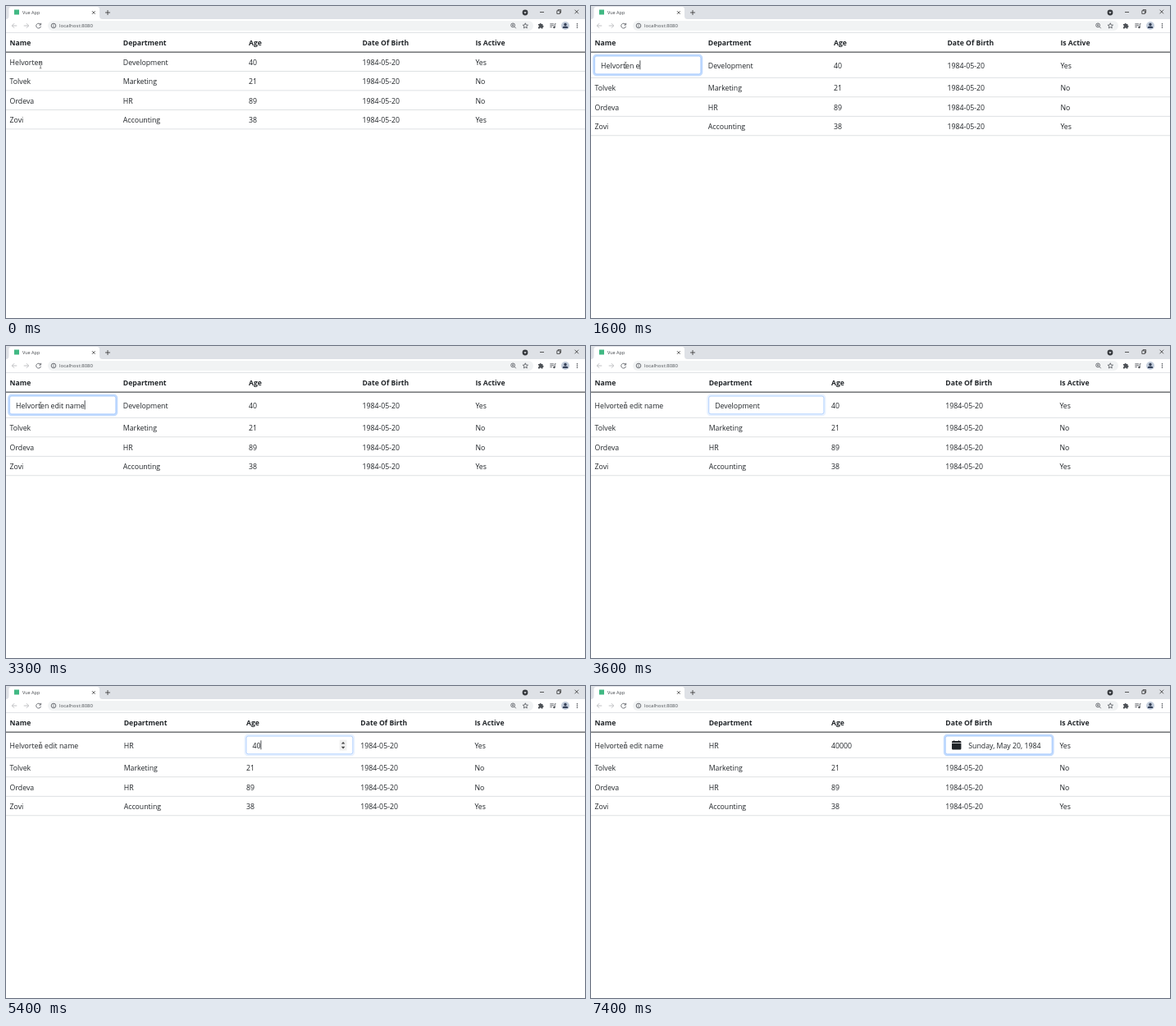
Recreate the animation shown at these times as an HTML page. Size 706 px wide and 380 px high, loop 8 s.

```html
<!DOCTYPE html>
<html lang="en">
<head>
<meta charset="utf-8">
<title>Vue App</title>
<style>
  html, body { margin: 0; width: 100%; height: 100%; overflow: hidden; background: #fff; }
  svg { display: block; width: 100vw; height: 100vh; }
  text { font: 8.75px "Open Sans", "Noto Sans", sans-serif; fill: #212529; white-space: pre; }
  .head { font-size: 8.65px; font-weight: 700; }
  .title { font-size: 5.5px; fill: #45494d; }
  .url { font-size: 6.1px; fill: #4d5156; }
  .icon { fill: none; stroke: #5f6368; stroke-width: .9; }
  .dim { stroke: #babcbe; }
  .dark { stroke: #333; stroke-width: .8; }
  .solid { fill: #4d5156; }
  .rule { fill: #d6dadd; }
</style>
</head>
<body>
<svg viewBox="0 0 706 380" preserveAspectRatio="none">
  <!-- browser tab strip -->
  <rect width="706" height="16" fill="#dee1e6"/>
  <path d="M0 16q3.5 0 3.5-4V4q0-3 3-3H111q3 0 3 3v8q0 4 3.500 4z" fill="#fff"/>
  <rect x="10" y="4.500" width="6" height="6" fill="#41b883"/>
  <text class="title" x="20" y="9.800">Vue App</text>
  <path class="icon dark" d="M105 6.200l3.600 3.600m0-3.600l-3.600 3.600M121 8h6m-3-3v6"/>
  <circle cx="633" cy="8" r="3.400" fill="#35383c"/>
  <path d="M631.300 7.300h3.400l-1.700 2.200z" fill="#dee1e6"/>
  <path class="icon dark" d="M651 7.500h5M671.800 5.800h3.600v3.600h-3.600zM673 5.800V4.600h3.600v3.600h-1.200M693.500 4.700l4.600 4.600m0-4.600l-4.600 4.600"/>

  <!-- toolbar -->
  <rect x="51" y="18" width="592" height="12" rx="6" fill="#f1f3f4"/>
  <rect y="32" width="706" height=".8" fill="#dadce0"/>
  <path class="icon dim" d="M13.300 24H7.300m2.800-2.800L7.300 24l2.800 2.800M21.700 24h6m-2.800-2.800l2.800 2.800-2.800 2.800"/>
  <path class="icon" d="M42 22.400a2.900 2.900 0 1 0 .5 2.400M42.600 20.800v2.300h-2.300"/>
  <circle class="icon" cx="58" cy="24" r="2.800" stroke-width=".7"/>
  <path class="icon" d="M58 23.600v2M58 22.200v.7"/>
  <text class="url" x="65" y="26.200">localhost:8080</text>
  <path class="icon" d="M619.800 25.200l2 2M617 23.400h2.200m-1.100-1.100v2.200"/>
  <circle class="icon" cx="618.100" cy="23.400" r="2.400"/>
  <path class="icon" stroke-width=".7" d="M633.300 20.800l.9 2.200 2.300.2-1.800 1.500.6 2.300-2-1.200-2 1.200.6-2.300-1.800-1.500 2.300-.2z"/>
  <path class="solid" d="M649 22h1.600a1.100 1.100 0 0 1 2.200 0h1.700v1.700a1.100 1.100 0 0 1 0 2.200v1.500h-1.800a1 1 0 0 0-2 0H649v-1.800a1 1 0 0 0 0-2z"/>
  <path class="icon" d="M663.300 21.800h4.600m-4.600 1.900h4.600m-4.600 1.900h2.600M669.200 26v-4.300h1.400"/>
  <circle class="solid" cx="668.400" cy="26" r="1.200"/>
  <circle cx="682" cy="24" r="5" fill="#c3cddb"/>
  <circle cx="682" cy="22.500" r="1.700" fill="#37435a"/>
  <path d="M678.700 27q0-2.400 3.300-2.400t3.300 2.400z" fill="#37435a"/>
  <g class="solid"><circle cx="696.500" cy="21.700" r=".8"/><circle cx="696.500" cy="24" r=".8"/><circle cx="696.500" cy="26.300" r=".8"/></g>

  <!-- table -->
  <g id="table"></g>
  <rect y="55.600" width="706" height="1.100" fill="#3c4043"/>

  <!-- active editor -->
  <g id="editor">
    <rect id="ring" y="59.900" height="24.100" rx="3.300" fill="none" stroke="#c2dbfe" stroke-width="2.500"/>
    <rect id="box" y="61.100" height="21.700" rx="2.300" fill="#fff" stroke="#86b7fe" stroke-width=".6"/>
    <text id="value" y="75.600" xml:space="preserve"></text>
    <rect id="caret" y="66.300" width=".8" height="11" fill="#212529"/>
    <g id="spin">
      <rect x="406.700" y="65.600" width="8.800" height="13" fill="#f0f0f0"/>
      <path d="M408.800 70.600h4.600l-2.300-2.700zM408.800 73.700h4.600l-2.300 2.700z" fill="#444"/>
    </g>
    <path id="calendar" fill="#212529" d="M440 69v-.8q0-1.200 1.200-1.200h1v-.7h1v.7h4.800v-.7h1v.7h1.200q1.200 0 1.200 1.200v.8zM440 69.800h11.400v6.500q0 1.200-1.200 1.200h-9q-1.200 0-1.200-1.200z"/>
  </g>

  <!-- text pointer -->
  <path d="M40.800 68.300q1.300 0 1.300.8 0-.8 1.300-.8M42.100 69v6.300M40.800 76q1.300 0 1.300-.8 0 .8 1.300.8" fill="none" stroke="#555" stroke-width=".7"/>
</svg>
<script>
const LOOP = 8000;
const HEAD = ["Name", "Department", "Age", "Date Of Birth", "Is Active"];
const BIRTH = "1984-05-20";
const ROWS = [
  ["Helvorten", "Development", "40", BIRTH, "Yes"],
  ["Tolvek", "Marketing", "21", BIRTH, "No"],
  ["Ordeva", "HR", "89", BIRTH, "No"],
  ["Zovi", "Accounting", "38", BIRTH, "Yes"]
];
const COLS_A = [4.6, 142.8, 296, 434.4, 572.4];
const COLS_B = [4.6, 143.7, 293, 432.3, 571.4];

// One editor per column: start time, box width, then [time, value, caret shown]
const EDITS = [
  { at: 500, w: 129.2, keys: [
    [500, "", 1], [1000, "", 0], [1300, " ", 1], [1600, " e", 1],
    [1900, " ed", 1], [2000, " edi", 1], [2300, " edit", 1], [2500, " edit ", 1],
    [2800, " edit n", 1], [2900, " edit na", 1], [3100, " edit nam", 1], [3300, " edit name", 1]
  ].map(([t, s, c]) => [t, ROWS[0][0] + s, c]) },
  { at: 3600, w: 140.2, keys: [[3600, "Development", 0], [4500, "HR", 0]] },
  { at: 5400, w: 129.8, keys: [
    [5400, "40", 1], [5900, "40", 0], [6400, "40", 1],
    [6500, "400", 1], [6700, "4000", 1], [6900, "40000", 1]
  ] },
  { at: 7300, w: 129.8, keys: [[7300, "Sunday, May 20, 1984", 0]] }
];

const $ = id => document.getElementById(id);
const set = (el, attrs) => { for (const k in attrs) el.setAttribute(k, attrs[k]); };
const show = (el, on) => { el.style.display = on ? "" : "none"; };
function add(tag, attrs, text = "") {
  const el = document.createElementNS("http://www.w3.org/2000/svg", tag);
  set(el, attrs);
  el.textContent = text;
  return $("table").appendChild(el);
}

const heads = HEAD.map(s => add("text", { class: "head", y: 48.2 }, s));
const rows = ROWS.map(row => ({
  rule: add("rect", { class: "rule", width: 706, height: .8 }),
  cells: row.map(s => add("text", {}, s))
}));

function draw(t) {
  const col = EDITS.findLastIndex(e => e.at <= t);
  const editing = col >= 0;
  const xs = col < 1 ? COLS_A : COLS_B;

  heads.forEach((el, c) => el.setAttribute("x", xs[c]));
  rows.forEach(({ rule, cells }, r) => {
    const drop = editing ? (r ? 7.9 : 3.8) : 0;
    rule.setAttribute("y", 79 + r * 23.5 + (editing ? 7.9 : 0));
    cells.forEach((el, c) => set(el, { x: xs[c], y: 71.8 + r * 23.5 + drop }));
  });
  rows[0].cells.forEach((el, c) => {
    el.textContent = c < col ? EDITS[c].keys.at(-1)[1] : ROWS[0][c];
    show(el, c !== col);
  });

  show($("editor"), editing);
  if (!editing) return;
  const { at, w, keys } = EDITS[col];
  const [, value, caret] = keys.findLast(k => k[0] <= t);
  const x = xs[col];
  const textX = x + (col === 3 ? 28 : 7.5);
  set($("ring"), { x: x - 1.2, width: w + 2.4, opacity: t - at < 100 ? .4 : 1 });
  set($("box"), { x, width: w });
  $("value").textContent = value;
  $("value").setAttribute("x", textX);
  show($("caret"), caret);
  if (caret) $("caret").setAttribute("x", textX + $("value").getComputedTextLength());
  show($("spin"), col === 2);
  show($("calendar"), col === 3);
}

const start = performance.now();
let last = -1;
function tick() {
  // the screen advances in tenths of a second
  const t = Math.floor((performance.now() - start) % LOOP / 100) * 100;
  if (t !== last) draw(last = t);
  requestAnimationFrame(tick);
}
tick();
</script>
</body>
</html>
```
